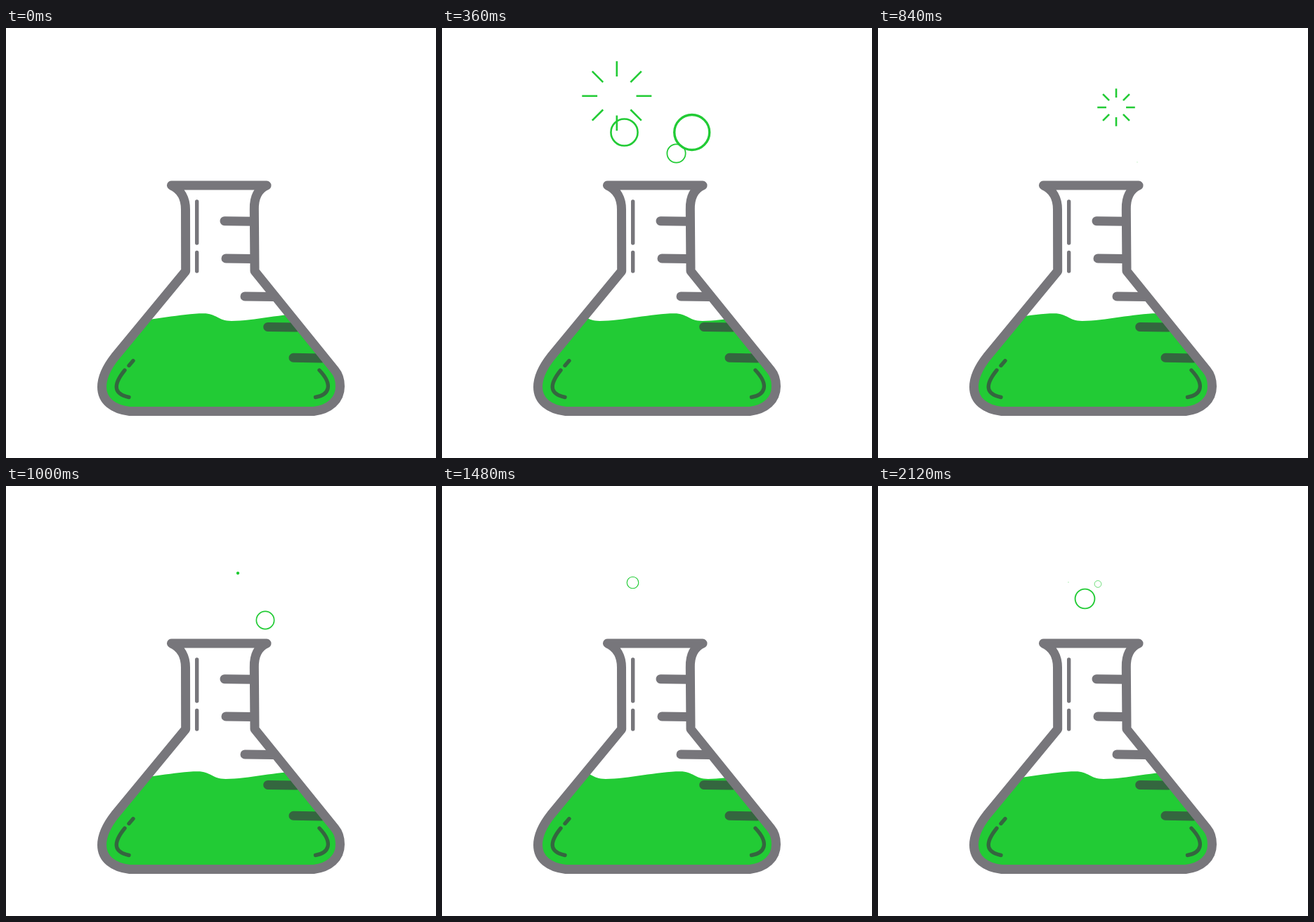
Animation, 612 px wide and 612 px high, one loop 2160 ms. Source, as an HTML page with a canvas:

```html
<!DOCTYPE html>
<html lang="en">
<head>
<meta charset="utf-8">
<title>Bubbling flask</title>
<style>
html, body { margin: 0; width: 100%; height: 100%; overflow: hidden; background: #fff; }
canvas { display: block; width: 612px; height: 612px; }
</style>
</head>
<body>
<canvas id="stage" width="612" height="612"></canvas>
<script>
const ctx = document.getElementById('stage').getContext('2d');
const LOOP = 2160, STEP = 40, GROW = 320;
const GRAY = '#77767b', GREEN = '#22cb35', DARK = '#34663f';
const WAVE = { period: 1060, length: 146, fall: 40, x: 281, top: 406.3, low: 417 };

const spot = (x, y) => ({ x, y });

// Spots that start one after another, a fixed gap apart.
const puff = (start, gap, ...spots) =>
  spots.map((s, i) => ({ ...s, start: start + i * gap }));

const bubbles = [
  puff(40, 76, spot(355.7, 148.5), spot(259.5, 148.5), spot(333.5, 178.5)),
  puff(838, 0, spot(369, 191)),
  puff(1054, 24, spot(360.5, 138.5), spot(334, 169.5), spot(307, 132)),
  puff(1374, 120, spot(271.5, 137.5), spot(276, 158)),
  puff(1704, 238, spot(258, 164.5), spot(294.5, 160.5)),
  puff(2058, 59, spot(313, 139.5), spot(271, 137))
].flat();

const right = spot(330, 124);
const bursts = [
  puff(40, 0, spot(248.8, 96.7)),
  puff(667, 0, spot(339, 113)),
  puff(987, 600, right, right)
].flat();

const flask = new Path2D(
  'M235.5 224 L371 224 C357.5 230 353 243 353.3 258 L354 346 L468 487' +
  ' C473 493 475.5 501 475.5 510 C475.5 530 460 543 438 545.5' +
  ' L176 545.5 C153 543 136.5 531 136.5 511 C136.5 496 144 482 155 468' +
  ' L255.7 346 L255.5 258 C255.5 243 249 230 235.5 224 Z');
const arcs = new Path2D(
  'M181 473.5 L175 480.5 M169 487 C152 508 153 521 175 525.5' +
  ' M446 487 C466 508 460 522 440.5 525.5');
const glints = new Path2D('M271.7 247 V306 M271.7 319.5 V346');
const grayMarks = new Path2D('M311 274.7 l40 .6 M313 328 l38 .6 M340 382 l41 .6');
const darkMarks = new Path2D('M372.7 425.5 l40 .6 M409 469.3 l40 .6');

function stroke(path, color, width) {
  ctx.strokeStyle = color;
  ctx.lineWidth = width;
  ctx.stroke(path);
}

function drawLiquid(t) {
  const { period, length, fall, top, low } = WAVE;
  const rise = length - fall;
  let x = WAVE.x + length * (t / period % 1) - 3 * length;
  ctx.save();
  ctx.clip(flask);
  ctx.beginPath();
  ctx.moveTo(x, top);
  while (x < 500) {
    const dip = x + fall, next = x + length;
    ctx.bezierCurveTo(x + fall * 0.48, top, dip - fall * 0.5, low, dip, low);
    ctx.bezierCurveTo(dip + rise * 0.3, low, next - rise * 0.3, top, next, top);
    x = next;
  }
  ctx.lineTo(x, 560);
  ctx.lineTo(100, 560);
  ctx.fillStyle = GREEN;
  ctx.fill();
  ctx.restore();
}

function drawBubble(x, y, k) {
  const r = 25 * k, p = new Path2D();
  p.arc(x, y, r, 0, Math.PI * 2);
  stroke(p, GREEN, Math.max(0.5, r * 0.135));
}

function drawBurst(x, y, k) {
  const outer = 49.5 * k, inner = Math.max(0, outer * 0.6 - 2), p = new Path2D();
  for (let i = 0; i < 8; i++) {
    const a = i * Math.PI / 4, c = Math.cos(a), s = Math.sin(a);
    p.moveTo(x + inner * c, y + inner * s);
    p.lineTo(x + outer * c, y + outer * s);
  }
  stroke(p, GREEN, 2.6);
}

function drawGrowing(list, t, draw) {
  for (const { x, y, start } of list) {
    const k = (t - start) / GROW;
    if (k > 0 && k <= 1) draw(x, y, k);
  }
}

function draw(t) {
  ctx.fillStyle = '#fff';
  ctx.fillRect(0, 0, 612, 612);
  drawLiquid(t);
  ctx.lineCap = ctx.lineJoin = 'round';
  stroke(darkMarks, DARK, 13);
  stroke(arcs, DARK, 5.4);
  stroke(grayMarks, GRAY, 13);
  stroke(glints, GRAY, 5.4);
  stroke(flask, GRAY, 13);
  ctx.lineCap = 'butt';
  drawGrowing(bursts, t, drawBurst);
  drawGrowing(bubbles, t, drawBubble);
}

const origin = performance.now();
function tick() {
  const t = (performance.now() - origin) % LOOP;
  draw(Math.floor(t / STEP) * STEP);
  requestAnimationFrame(tick);
}
tick();
</script>
</body>
</html>
```
